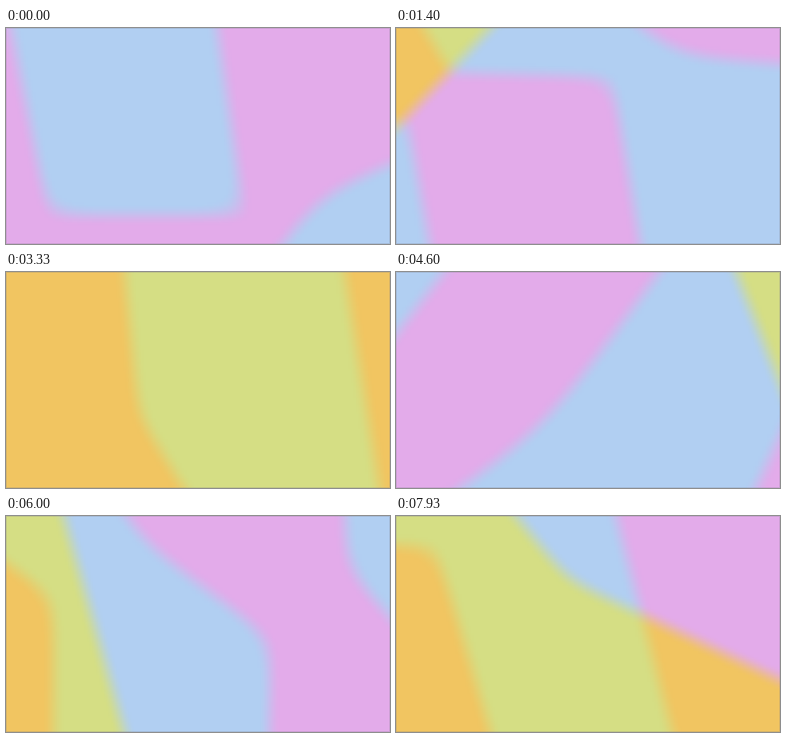
An HTML page with a canvas for the animation above (8 s loop, 480 by 270 pixels).

```html
<!DOCTYPE html>
<html lang="en">
<head>
<meta charset="utf-8">
<title>Pastel flow</title>
<style>
  html, body { margin: 0; width: 100%; height: 100%; overflow: hidden; background: #b1cff2; }
  canvas { display: block; width: 100vw; height: 100vh; }
  body::after { content: ""; position: fixed; inset: 0; border: 1px solid rgba(120, 120, 130, .25); }
</style>
</head>
<body>
<canvas id="stage" width="160" height="90"></canvas>
<script>
const W = 160, H = 90, SCALE = 3;
const LOOP = 8000, TICKS = 120;
const SOFT = 14;

// Each field is a signed distance: positive inside, negative outside.
// A line is positive on the right-hand side of its direction of travel.
const line = (x1, y1, x2, y2) => {
  const dx = x2 - x1, dy = y2 - y1, len = Math.hypot(dx, dy);
  return (x, y) => ((y - y1) * dx - (x - x1) * dy) / len;
};
const not = f => (x, y) => -f(x, y);
const grow = (f, amount) => (x, y) => f(x, y) + amount;
const blend = (k, fields) => (x, y) =>
  -k * Math.log(fields.reduce((sum, f) => sum + Math.exp(-f(x, y) / k), 0));
const all = (...fields) => blend(14, fields);
const any = (...fields) => not(blend(6, fields.map(not)));

// Pink and orange areas, against blue and green
const shapeKeys = [
  [0, not(any(
    all(line(40, 170, 10, 20), line(230, 234, 100, 234), line(264, 0, 290, 180)),
    all(line(360, 220, 480, 170), line(332, 288, 380, 222))))],
  [21, any(
    all(line(0, 54, 230, 60), line(270, 60, 305, 270), line(42, 270, 15, 120)),
    all(line(35, 0, 70, 60), line(60, 130, 0, 118)),
    all(line(480, 45, 370, 37), line(345, 32, 306, 0)))],
  [38, any(
    all(line(122, 90, 114, 0), line(270, 106, 150, 106), line(347, 70, 270, 110), line(376, 0, 345, 70)),
    all(line(0, 95, 75, 115), line(93, 150, 95, 270)),
    all(line(400, 270, 418, 200), line(438, 173, 480, 128)))],
  [50, any(line(148, 0, 165, 170), line(163, 175, 222, 270), line(465, 260, 423, 0))],
  [69, any(
    all(line(0, 78, 60, 0), line(329, 0, 190, 190), line(210, 182, 75, 274)),
    line(450, 270, 480, 205))],
  [90, any(
    not(any(
      all(line(331, 180, 329, 270), any(line(185, 43, 315, 140), line(150, 0, 185, 50))),
      all(line(423, 60, 423, 0), line(480, 127, 430, 72)))),
    all(line(0, 58, 40, 86), line(60, 120, 59, 270)))],
  [119, any(line(345, 270, 275, 0), all(line(0, 36, 40, 36), line(50, 40, 118, 270)))]
];

// Warm palette areas sweeping over the cool palette
const corner = line(118, 0, 0, 125);
const rightEdge = line(480, 140, 425, 0);
const leftEdge = line(72, 0, 148, 270);
const warmKeys = [
  [0, grow(corner, -150)],
  [21, corner],
  [38, grow(corner, 480)],
  [50, grow(rightEdge, 520)],
  [69, rightEdge],
  [76, grow(leftEdge, -190)],
  [90, leftEdge],
  [119, any(line(150, 0, 215, 80), line(215, 80, 480, 205))]
];

const sample = ([tick, field]) => ({
  tick,
  values: Float32Array.from({ length: W * H }, (_, i) =>
    field((i % W + .5) * SCALE, (Math.floor(i / W) + .5) * SCALE))
});
const shapes = shapeKeys.map(sample);
const warmth = warmKeys.map(sample);

// Spans of ticks with motion; the picture rests between them
const runs = [
  [0, 0], [4, 8], [10, 10], [15, 15], [19, 30], [33, 38], [43, 47], [50, 50],
  [56, 59], [61, 63], [67, 69], [72, 83], [85, 85], [90, 95], [100, 101],
  [104, 104], [107, 107], [113, 113], [118, 119]
];
const heldTick = tick => {
  const [, end] = runs.filter(([start]) => start <= tick).pop();
  return Math.min(tick, end);
};

const between = (keys, tick) => {
  let i = 0;
  while (i < keys.length - 2 && keys[i + 1].tick <= tick) i++;
  const from = keys[i], to = keys[i + 1];
  const s = (tick - from.tick) / (to.tick - from.tick);
  return p => from.values[p] + (to.values[p] - from.values[p]) * s;
};

const smooth = d => {
  const s = Math.min(1, Math.max(0, (d + SOFT) / (2 * SOFT)));
  return s * s * (3 - 2 * s);
};
const mix = (a, b, s) => a + (b - a) * s;

const blue = [177, 207, 242], pink = [227, 171, 234];
const green = [213, 222, 132], orange = [241, 197, 97];
const ctx = document.getElementById("stage").getContext("2d");
const image = ctx.createImageData(W, H);

function draw(tick) {
  const shapeAt = between(shapes, tick), warmAt = between(warmth, tick);
  for (let p = 0; p < W * H; p++) {
    const shape = smooth(shapeAt(p)), warm = smooth(warmAt(p));
    for (let c = 0; c < 3; c++) {
      image.data[p * 4 + c] = mix(
        mix(blue[c], pink[c], shape), mix(green[c], orange[c], shape), warm);
    }
    image.data[p * 4 + 3] = 255;
  }
  ctx.putImageData(image, 0, 0);
}

let shown = -1;
function frame() {
  const time = performance.now() % LOOP;
  const tick = heldTick(Math.floor(time * TICKS / LOOP + .1) % TICKS);
  if (tick !== shown) draw(shown = tick);
  requestAnimationFrame(frame);
}
frame();
</script>
</body>
</html>
```
